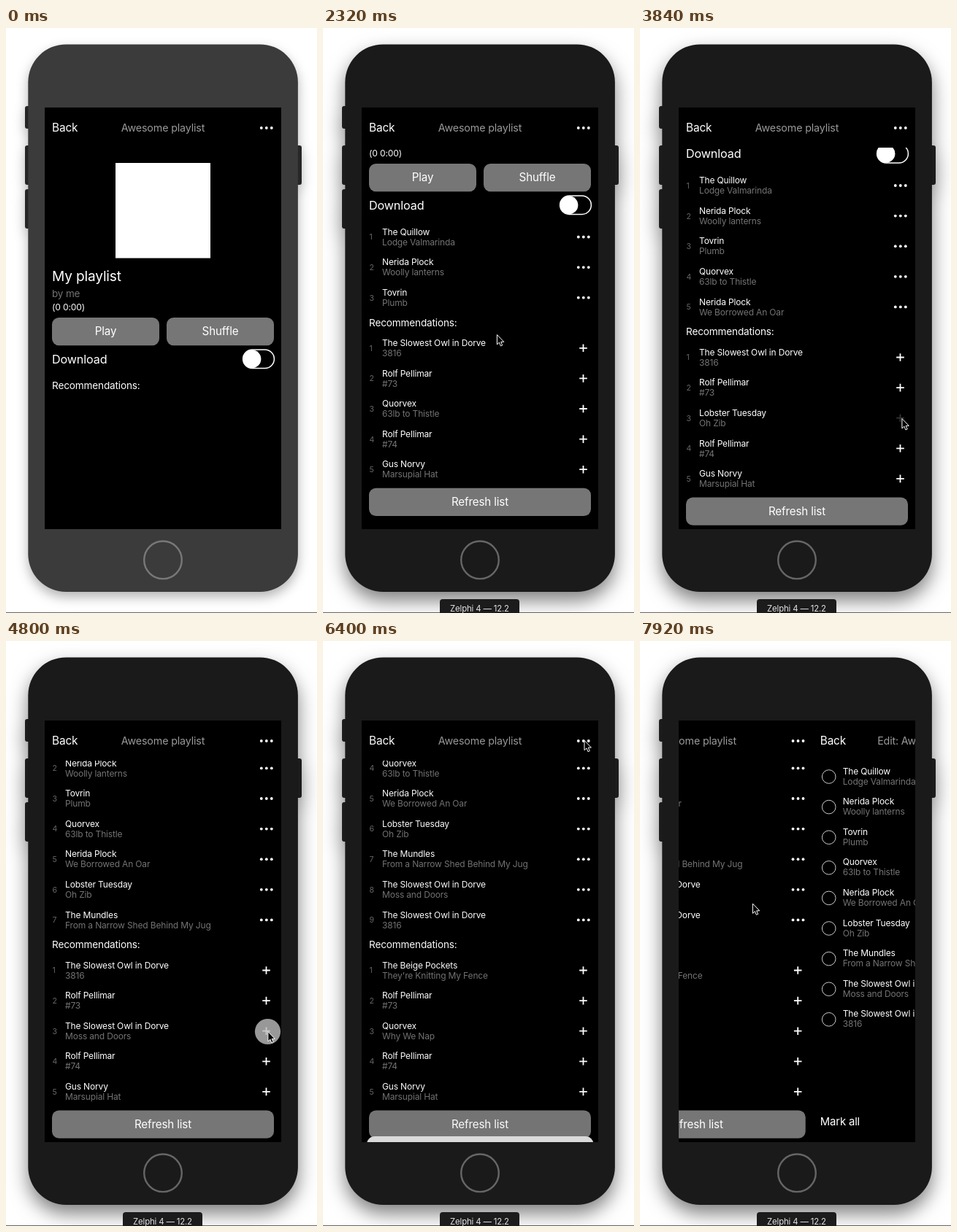
Recreate the animation shown at these times as an HTML page. Size 426x802 px, loop 8000 ms.

```html
<!DOCTYPE html>
<html lang="en">
<head>
<meta charset="utf-8">
<title>Playlist demo</title>
<style>
  html, body { margin: 0; width: 100%; height: 100%; overflow: hidden; background: #fff; }
  svg { display: block; width: 426px; height: 802px; font-family: Inter, "Open Sans", sans-serif; letter-spacing: -.01em; }
</style>
</head>
<body>
<svg viewBox="0 0 426 802">
  <defs>
    <clipPath id="screenClip"><rect x="53" y="109" width="324" height="578"/></clipPath>
    <clipPath id="listClip"><rect x="53" y="164" width="324" height="523"/></clipPath>
  </defs>
  <rect y="801" width="426" height="1" fill="#666"/>
  <g id="phone">
    <g id="keys">
      <rect x="26" y="107" width="8" height="31" rx="3"/>
      <rect x="26" y="161" width="8" height="54" rx="3"/>
      <rect x="26" y="221" width="8" height="54" rx="3"/>
      <rect x="396" y="161" width="9" height="54" rx="3"/>
    </g>
    <rect id="body" x="30.3" y="22.4" width="369.6" height="750.6" rx="52"/>
  </g>
  <circle id="home" cx="215" cy="729.3" r="25.8" fill="none" stroke-width="2.4"/>
  <g id="label">
    <rect x="160" y="783" width="109" height="30" rx="4" fill="#1c1c1c"/>
    <text x="214.5" y="800" font-size="11.4" fill="#e4e4e4" text-anchor="middle">Zelphi 4 — 12.2</text>
  </g>
  <rect x="53" y="109" width="324" height="578"/>
  <g id="scene" clip-path="url(#screenClip)"></g>
  <g id="pointer"></g>
</svg>
<script>
const LOOP = 8000, PITCH = 41.6, WIDTH = 324;
const TAPS = [3120, 3680, 4080, 4400, 4800, 5520];
const HOLD = 160;
const GREY = '#737373', BUTTON = '#767676', BLUE = '#0f6fe8';

const startTracks = [
  ['The Quillow', 'Lodge Valmarinda'],
  ['Nerida Plock', 'Woolly lanterns'],
  ['Tovrin', 'Plumb']
];
const added = [
  ['Quorvex', '63lb to Thistle'],
  ['Nerida Plock', 'We Borrowed An Oar'],
  ['Lobster Tuesday', 'Oh Zib'],
  ['The Mundles', 'From a Narrow Shed Behind My Jug'],
  ['The Slowest Owl in Dorve', 'Moss and Doors'],
  ['The Slowest Owl in Dorve', '3816']
];

// Each key: time, x, y
const cursorKeys = [
  [1600, 249, 55], [1840, 209, 672.5], [2160, 209, 672.5], [2320, 238, 420.5],
  [2960, 354, 525], [3100, 358.5, 535.5], [5000, 358.5, 535.5], [5340, 364, 458.5],
  [5760, 364, 458.5], [6100, 357.6, 136.3], [6560, 357.6, 136.3], [7280, 191, 605],
  [7500, 191, 605], [7920, 154, 360]
];
const scrollKeys = [[2160, 0], [2240, 120], [2320, 211], [2720, 198.3]];
const touches = [[2000, 2300], ...TAPS.map(t => [t, t + HOLD]), [6160, 6320], [7360, 7520]];

const $ = id => document.getElementById(id);
const ramp = (t, from, length) => Math.min(1, Math.max(0, (t - from) / length));
const smooth = x => x * x * (3 - 2 * x);
const mix = (a, b, k) => a + (b - a) * k;
const grey = v => `rgb(${[v, v, v].map(Math.round)})`;

function follow(keys, t) {
  if (t <= keys[0][0]) return keys[0].slice(1);
  for (let i = 1; i < keys.length; i++) {
    const a = keys[i - 1], b = keys[i];
    if (t <= b[0]) {
      const k = smooth(ramp(t, a[0], b[0] - a[0]));
      return a.slice(1).map((v, j) => mix(v, b[j + 1], k));
    }
  }
  return keys[keys.length - 1].slice(1);
}

const text = (x, y, size, str, fill = '#fff', more = '') =>
  `<text x="${x}" y="${y}" font-size="${size}" fill="${fill}" ${more}>${str}</text>`;
const middle = (x, y, size, str, fill, more = '') =>
  text(x, y, size, str, fill, 'text-anchor="middle" ' + more);
const box = (x, y, w, h, r, fill, more = '') =>
  `<rect x="${x}" y="${y}" width="${w}" height="${h}" rx="${r}" fill="${fill}" ${more}/>`;
const dot = (x, y, r, more) => `<circle cx="${x}" cy="${y}" r="${r}" ${more}/>`;
const dots = y => [349.8, 356.8, 363.8].map(x => dot(x, y, 1.9, 'fill="#fff"')).join('');
const plus = (y, alpha) =>
  `<path d="M351.2 ${y}h10.6M356.5 ${y - 5.3}v10.6" stroke="#fff" stroke-width="1.8" opacity="${alpha}"/>`;
const button = (x, y, w, str) =>
  box(x, y, w, 38.2, 9.5, BUTTON) + middle(x + w / 2, y + 24.4, 15.2, str);
const song = (x, y, [artist, title]) =>
  text(x, y - 2.8, 12, artist) + text(x, y + 11.2, 12, title, GREY);
const numbered = (y, i, item) =>
  text(63.5, y + 3.9, 10.6, i + 1, '#666') + song(81, y, item);

function header(title) {
  return text(63, 142.4, 15.4, 'Back') + middle(215, 141.8, 14.3, title, '#999');
}

// The tapped plus dips while held, then fades back
function plusAlpha(t, slot) {
  const tap = TAPS.filter(p => p <= t).pop();
  if (!tap || slot !== (tap === TAPS[5] ? 0 : 2)) return 1;
  return mix(1, .2, ramp(t, tap, 150)) + .8 * ramp(t, tap + HOLD, 240);
}

function playlist(t, tracks, count) {
  const scroll = follow(scrollKeys, t)[0] + PITCH * count;
  const rec = 490 + PITCH * tracks.length;
  const recs = [
    count < 6 ? added[5] : ['The Beige Pockets', "They're Knitting My Fence"],
    ['Rolf Pellimar', '#73'],
    count < 5 ? added[count] : ['Quorvex', 'Why We Nap'],
    ['Rolf Pellimar', '#74'],
    ['Gus Norvy', 'Marsupial Hat']
  ];
  let s = box(150, 185, 130, 130.5, 0, '#fff')
    + text(63, 346.6, 19.1, 'My playlist')
    + text(63, 368.6, 13.5, 'by me', GREY)
    + text(63, 387.2, 12.1, '(0 0:00)')
    + button(63, 397, 147, 'Play') + button(220, 397, 147, 'Shuffle')
    + text(63, 459.6, 16.2, 'Download')
    + box(324.6, 441, 42.8, 25.4, 12.7, 'none', 'stroke="#fff" stroke-width="1.5"')
    + dot(337, 453.7, 12.4, 'fill="#fff"')
    + text(63, rec + 4.7, 13.6, 'Recommendations:');
  tracks.forEach((item, i) => {
    const y = 497.5 + PITCH * i;
    s += numbered(y, i, item) + dots(y);
  });
  if (t >= 240) {
    recs.forEach((item, i) => {
      const y = rec + 35 + PITCH * i;
      s += numbered(y, i, item) + plus(y, plusAlpha(t, i));
    });
    s += button(63, rec + 227, 304, 'Refresh list');
  }
  return `<g clip-path="url(#listClip)"><g transform="translate(0 ${-scroll})">${s}</g></g>`
    + header('Awesome playlist') + dots(137);
}

function editor(tracks) {
  return header('Edit: Awesome playlist') + tracks.map((item, i) => {
    const y = 186 + PITCH * i;
    return dot(75, y, 9.3, 'fill="none" stroke="#ccc"') + song(94, y - .6, item);
  }).join('') + text(63, 664.4, 14.9, 'Mark all');
}

function sheet(k) {
  return box(53, 109, WIDTH, 578, 0, '#000', `opacity="${.4 * k}"`)
    + `<g transform="translate(0 ${151 * (1 - k)})">`
    + box(60, 536, 310.5, 87.5, 11, grey(mix(218, 191, k)))
    + middle(215, 559.2, 11.2, 'Prefrences', '#7c7c7c', 'font-weight="600"')
    + box(60, 573.5, 310.5, 1, 0, '#777')
    + middle(215, 605, 16.4, 'Edit playlist', BLUE)
    + box(60, 630.5, 310.5, 49.5, 11, '#fff')
    + middle(215, 661.3, 16.6, 'Cancel', BLUE, 'font-weight="600"')
    + '</g>';
}

function pointer(t) {
  if (t < 1600) return '';
  const [x, y] = follow(cursorKeys, t);
  const held = touches.some(([a, b]) => t >= a && t < b);
  return (held ? dot(x, y, 17.6, 'fill="#bfbfbf" opacity=".8"') : '')
    + `<path transform="translate(${x} ${y})" d="M.4 0V13.4L3.4 10.6 5.4 15.4 7.7 14.4 5.7 9.8H9.8Z"
        fill="#000" stroke="#fff" stroke-width="1" stroke-linejoin="round"/>`;
}

function phone(t) {
  const k = ramp(t, 800, 320);
  $('body').setAttribute('fill', grey(mix(59, 26, k)));
  $('keys').setAttribute('fill', grey(mix(38, 28, k)));
  $('home').setAttribute('stroke', grey(mix(120, 102, k)));
  $('label').setAttribute('opacity', k);
  $('phone').style.filter =
    `drop-shadow(0 ${mix(7, 12, k)}px ${mix(8, 13, k)}px rgba(0,0,0,${mix(.3, .5, k)}))`;
}

function draw(t) {
  const count = TAPS.filter(p => p + HOLD <= t).length;
  const tracks = t < 400 ? [] : startTracks.concat(added.slice(0, count));
  const shown = smooth(ramp(t, 6345, 400)) - smooth(ramp(t, 7500, 220));
  const push = WIDTH * smooth(ramp(t, 7723, 435));
  phone(t);
  $('scene').innerHTML =
    `<g transform="translate(${-push} 0)">${playlist(t, tracks, count)}</g>`
    + (push ? `<g transform="translate(${WIDTH - push} 0)">${editor(tracks)}</g>` : '')
    + (shown > 0 ? sheet(shown) : '');
  $('pointer').innerHTML = pointer(t);
}

const start = performance.now();
function tick() {
  draw((performance.now() - start) % LOOP);
  requestAnimationFrame(tick);
}
tick();
</script>
</body>
</html>
```
